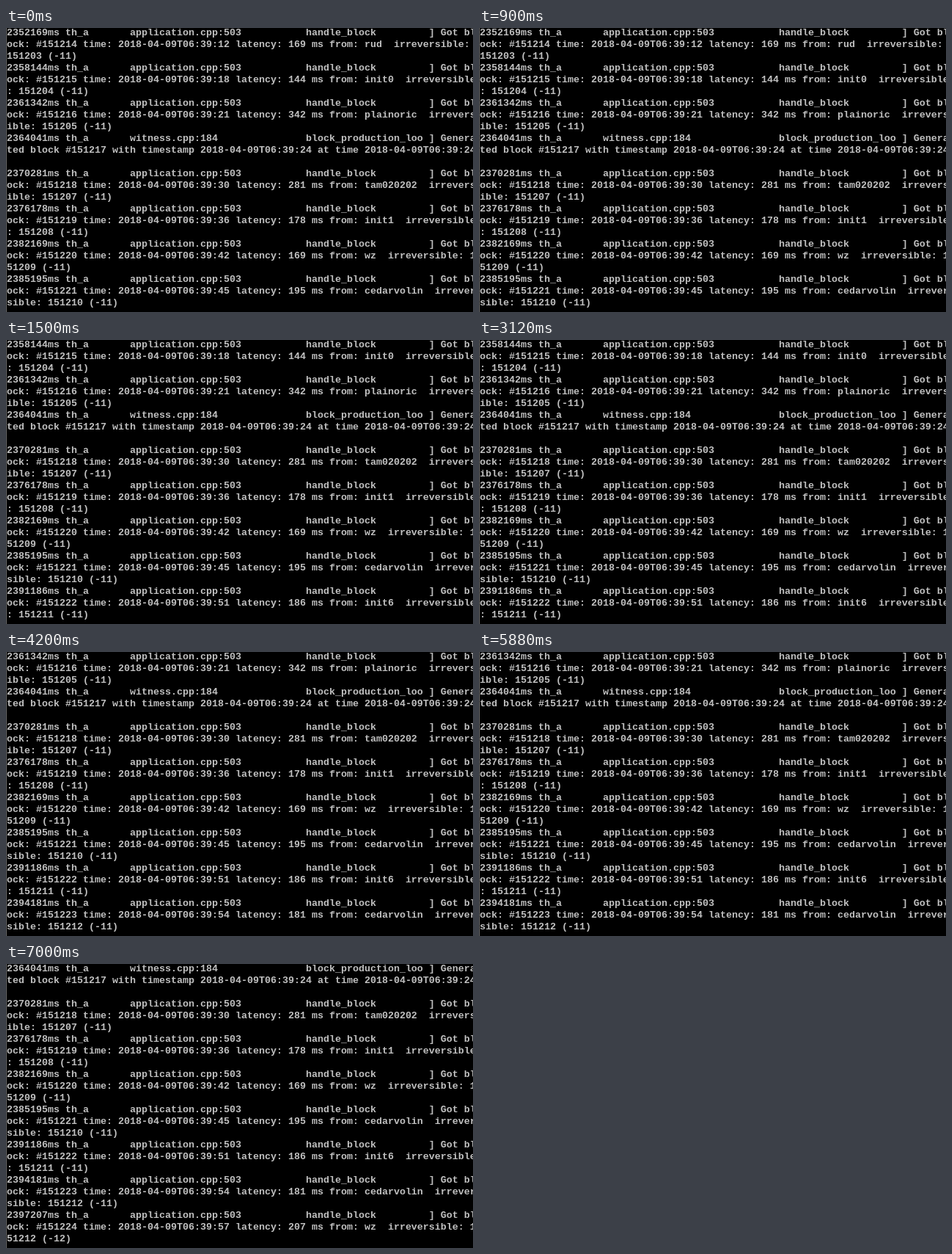
An HTML page for the animation above (8 s loop, 637 px wide and 387 px high).

```html
<!DOCTYPE html>
<html lang="en">
<head>
<meta charset="utf-8">
<title>Block log</title>
<style>
  html, body { margin: 0; width: 100%; height: 100%; overflow: hidden; background: #000; }
  body { position: relative; }
  pre {
    position: absolute; left: 1px; top: -1px; margin: 0;
    color: #c0c0c0;
    /* 80 columns of 8px, rows of 16px */
    font: bold 13.333px/16px "Liberation Mono", monospace;
    font-variant-ligatures: none;
  }
  #edge { position: absolute; inset: 0; border-left: 1px solid #696969; }
</style>
</head>
<body>
<pre id="log"></pre>
<div id="edge"></div>
<script>
const COLS = 80, VISIBLE = 8, LOOP = 8000;
const SCROLLS = [1500, 4200, 7000];
const FIRST_BLOCK = 151214;

// [milliseconds past the hour, sender]; no sender means a block made here
const events = [
  [2352169, "rud"], [2358144, "init0"], [2361342, "plainoric"], [2364041],
  [2370281, "tam020202"], [2376178, "init1"], [2382169, "wz"], [2385195, "cedarvolin"],
  [2391186, "init6"], [2394181, "cedarvolin"], [2397207, "wz"]
];

function entry([ms, sender], i) {
  const block = FIRST_BLOCK + i;
  const lag = i === events.length - 1 ? 12 : 11;
  const second = Math.floor(ms / 1000);
  const stamp = `2018-04-09T06:${Math.floor(second / 60)}:${second % 60}`;
  const head = (file, func) =>
    `${ms}ms th_a`.padEnd(21) + file.padEnd(30) + func.padEnd(21) + "] ";
  const text = sender
    ? head("application.cpp:503", "handle_block") +
      `Got block: #${block} time: ${stamp} latency: ${ms % 1000} ms from: ${sender}` +
      `  irreversible: ${block - lag} (-${lag})`
    : head("witness.cpp:184", "block_production_loo") +
      `Generated block #${block} with timestamp ${stamp} at time ${stamp}`;
  // A full second row leaves the third one blank
  return [0, 1, 2].map(r => text.slice(r * COLS, (r + 1) * COLS)).join("\n");
}

const entries = events.map(entry);
const log = document.getElementById("log");
let shown = -1;

function draw() {
  const t = performance.now() % LOOP;
  const top = SCROLLS.filter(s => t >= s).length;
  if (top !== shown) {
    log.textContent = entries.slice(top, top + VISIBLE).join("\n");
    shown = top;
  }
  requestAnimationFrame(draw);
}
draw();
</script>
</body>
</html>
```
